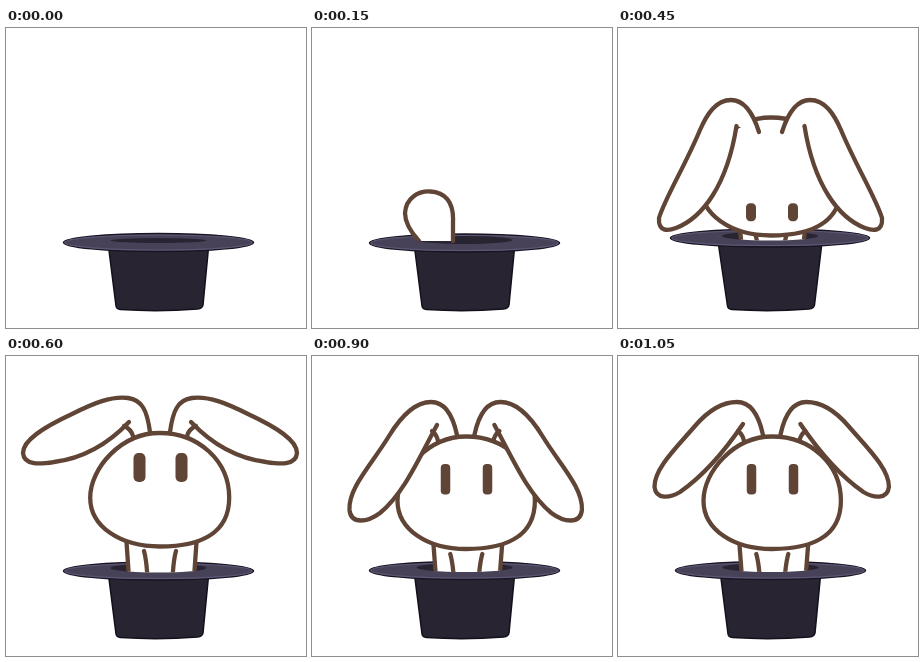
Animation, 300 px wide and 300 px high, one loop 1200 ms. Source, as an HTML page:

```html
<!DOCTYPE html>
<html lang="en">
<head>
<meta charset="utf-8">
<title>Rabbit in a hat</title>
<style>
  html, body { margin: 0; width: 100%; height: 100%; overflow: hidden; background: #fff; }
  svg { display: block; width: 100%; height: 100%; }
  .pose {
    visibility: hidden;
    animation: show 1200ms step-end infinite;
    animation-delay: calc(var(--slot) * 150ms - 1200ms);
  }
  @keyframes show {
    0% { visibility: visible; }
    12.5%, 100% { visibility: hidden; }
  }
  .fur { fill: #fff; stroke: #604536; stroke-width: 4.3; stroke-linecap: round; stroke-linejoin: round; }
  .line { fill: none; }
  .eye { fill: #604536; stroke: none; }
  .felt { fill: #282432; stroke: #13101b; stroke-width: 1.5; stroke-linejoin: round; }
  .brim { fill: #484259; stroke: #171321; stroke-width: 1.5; }
  .rim { fill: none; stroke: #5d5675; stroke-width: 1.2; }
  .hole { fill: #282432; }
</style>
</head>
<body>
<svg id="stage" viewBox="0 0 300 300"></svg>
<script>
const fur = (d, extra = '') => `<path class="fur ${extra}" d="${d}"/>`;
const ellipse = (name, x, y, rx, ry) =>
  `<ellipse class="${name}" cx="${x}" cy="${y}" rx="${rx}" ry="${ry}"/>`;
const mirrored = (shape, axis) =>
  shape + `<g transform="translate(${2 * axis}) scale(-1 1)">${shape}</g>`;

function head(x, top, bottom, half) {
  const mid = top + (bottom - top) * 0.57, k = half * 0.56;
  const up = mid - (mid - top) * 0.57, down = mid + (bottom - mid) * 0.6;
  return fur(`M${x} ${top}C${x + k} ${top} ${x + half} ${up} ${x + half} ${mid}
    S${x + k} ${bottom} ${x} ${bottom}S${x - half} ${down} ${x - half} ${mid}
    S${x - k} ${top} ${x} ${top}Z`);
}

const eyes = (x, y, w, h) => [x - 21, x + 21].map(cx =>
  `<rect class="eye" x="${cx - w / 2}" y="${y}" width="${w}" height="${h}" rx="${w * 0.42}"/>`).join('');

const torso = (x, top, half) => fur(`M${x - half} ${top}L${x - half + 2.5} 222H${x + half - 2.5}L${x + half} ${top}`) +
  mirrored(fur(`M${x - 17.5} ${top + 9}Q${x - 15} ${top + 18} ${x - 14} 222`, 'line'), x - 1.5);

function hat({ x, y, rx, ry, half, hole }, rabbit, slot) {
  const [hy, hr] = hole;
  const base = `M${x - half} ${y}L${x - 42.5} 278Q${x - 42} 281.2 ${x - 38} 281.5
    Q${x} 284 ${x + 39} 281Q${x + 44} 280.5 ${x + 44.5} 277L${x + half} ${y}Z`;
  return `<clipPath id="inside${slot}"><path d="M0 0H300V${hy}H${x + 48}A48 ${hr} 0 0 1 ${x - 48} ${hy}H0Z"/></clipPath>
    <path class="felt" d="${base}"/>` +
    ellipse('brim', x, y, rx, ry) + ellipse('rim', x, y, rx - 1.5, ry - 1.5) +
    ellipse('hole', x, hy, 48, hr) +
    `<g clip-path="url(#inside${slot})">${rabbit}</g>`;
}

const restHat = { x: 152.5, y: 214.5, rx: 95, ry: 9, half: 50.5, hole: [211.5, 4.5] };
const idleHat = { ...restHat, hole: [212.5, 2.5] };
const lowHat = { ...restHat, x: 151.5, y: 212, rx: 93.5, ry: 8, hole: [210, 4] };
const wideHat = { ...restHat, x: 152, y: 210, rx: 99.5, ry: 9, half: 52.5, hole: [208, 4.5] };

const firstEar = fur('M107 213C96 201 93 192 93 185C94 170 106 163 118 163.5C133 164 142 174 141 194V213');
const peeking = firstEar +
  fur('M151 213V192C150 168 162 156 180 155C201 154 212 172 208 188C206 198 200 204 198 213') +
  fur('M127 192Q135 192 136 199Q151 194 165 199Q174 195 173 190Q172 185 164 190', 'line') +
  fur('M136 199L142 214M171 196Q167 203 165 214', 'line');

const rising = torso(154.5, 196, 33) + head(153, 89.5, 207.5, 70.5) + eyes(154, 175.3, 10, 18) +
  mirrored(fur(`M141 104C135 85 126 72 113 72C98 72 89 86 82 102C67 138 47 170 41 190
    C40 204 50 203 58 200C84 190 109 158 118.5 98`), 152.5);

const upright = torso(155.5, 186, 35) + head(153.7, 77, 190.5, 69.5) + eyes(154.5, 97, 12, 29) +
  mirrored(fur(`M144 76C141 54 136 44 122 42C105 40 88 47 66 58C38 71 17 84 17 97
    C18 110 35 108 48 106C80 102 103 87 123 66`) + fur('M118 70Q125 73 127 80', 'line'), 154);

const settled = ear => torso(155.8, 189, 34.3) + head(154.2, 80.5, 193, 68.7) + eyes(154.5, 108, 9.5, 30.5) +
  mirrored(fur(`M145 79C141 60 133 46 119 46${ear}`) + fur('M120 75Q125 79 126 85', 'line'), 153.7);

const poses = [
  [idleHat, ''],
  [{ ...restHat, y: 215, hole: [212, 4] }, firstEar],
  [lowHat, peeking],
  [wideHat, rising],
  [{ ...restHat, y: 215, hole: [212, 4.5] }, upright],
  [restHat, settled('C102 46 90 59 78 75C60 100 35 123 40.5 140C43 151 61 145 72 137C95 120 106 96 125 69')],
  [restHat, settled('C102 46 88 62 77 80C60 108 36 132 37.5 154C39 169 56 166 68 157C92 137 106 104 125 69')],
  [restHat, settled('C102 46 89 56 77 70C58 92 36 113 36.5 131C38 144 52 142 62 136C85 120 106 96 125 68')]
];

document.getElementById('stage').innerHTML = poses.map(([shape, rabbit], slot) =>
  `<g class="pose" style="--slot:${slot}">${hat(shape, rabbit, slot)}</g>`).join('');
</script>
</body>
</html>
```
